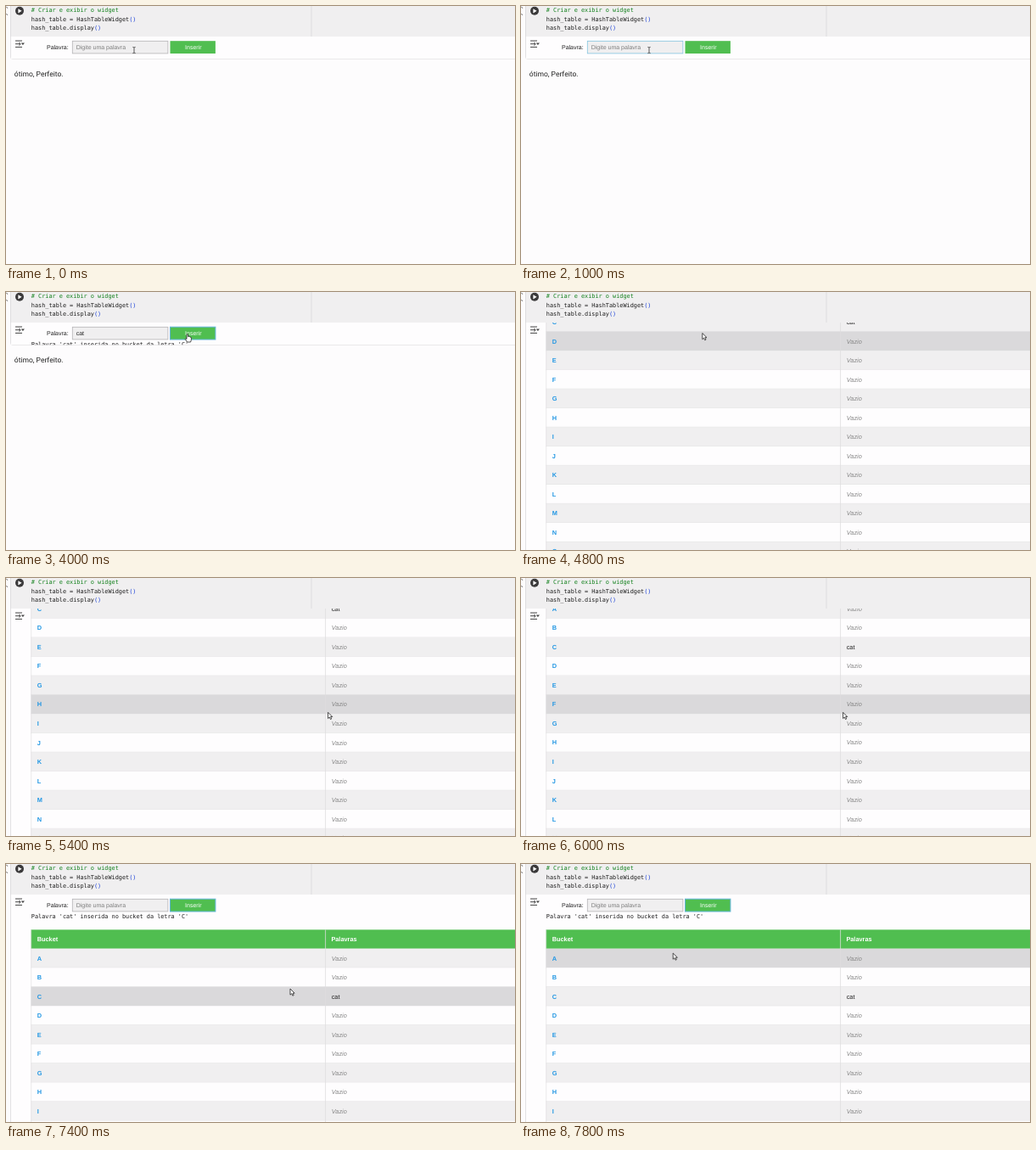
Write an HTML page that moves like this. It is 600x304 px and loops after 8 s.

```html
<!DOCTYPE html>
<html lang="pt">
<head>
<meta charset="utf-8">
<title>Hash table widget</title>
<style>
  html, body { margin: 0; width: 100%; height: 100%; overflow: hidden; background: #fdfcfd; }
  svg { display: block; width: 600px; height: 304px; }
  text { white-space: pre; text-rendering: geometricPrecision; }
  .code { font: 6.85px "DejaVu Sans Mono", monospace; fill: #1c1c1c; }
  .ui { font: 7px "Liberation Sans", Arial, sans-serif; fill: #222; }
  .cell { font: 7.35px "Liberation Sans", Arial, sans-serif; fill: #222; }
  .key { font-weight: bold; fill: #2196e3; }
  .head { font-weight: bold; fill: #fff; }
  .empty { font-style: italic; fill: #858585; }
  .note { font: 8.5px Roboto, sans-serif; fill: #222; }
  .paren { fill: #1a41d8; }
</style>
</head>
<body>
<svg viewBox="0 0 600 304">
  <defs>
    <clipPath id="view"><rect id="viewBox" x="6" y="36" width="594" height="26.3"/></clipPath>
  </defs>

  <rect width="600" height="304" fill="#fdfcfd"/>
  <text class="note" x="9.8" y="83">ótimo, Perfeito.</text>
  <path id="cellEdge" d="M5.5 36V60Q5.5 62.5 8 62.5H600" fill="none" stroke="#e2e1e3"/>

  <g clip-path="url(#view)">
    <rect x="6" y="36" width="594" height="268" fill="#fefdfe"/>
    <g id="scroller">
      <text class="ui" x="48" y="51">Palavra:</text>
      <rect id="field" x="78.3" y="41.3" width="112.6" height="14.6" fill="#f0eff0"/>
      <text id="entry" class="ui" x="82.7" y="51"></text>
      <rect id="button" x="193.5" y="41.2" width="53.4" height="14.8" fill="#50be50"/>
      <text class="ui" x="220.8" y="51" text-anchor="middle" style="fill:#fff">Inserir</text>
      <text id="message" class="code" x="29.8" y="64.3">Palavra 'cat' inserida no bucket da letra 'C'</text>
      <g id="table"></g>
    </g>
  </g>

  <rect x="5" width="595" height="36" fill="#f0eff0"/>
  <path d="M5.5 0V36M360 0V36" stroke="#dedddf"/>
  <path d="M0 1.2Q2 1 1.8 3M0 9.5Q2 9.3 1.6 11" fill="none" stroke="#777" stroke-width=".8"/>
  <circle cx="16" cy="5.8" r="5" fill="#3b3a3b"/>
  <path d="M14.4 3.2L18.6 5.8L14.4 8.4Z" fill="#fff"/>
  <text class="code" x="29.8" y="7.4" style="fill:#12801c"># Criar e exibir o widget</text>
  <text class="code" x="29.8" y="17.8">hash_table = HashTableWidget<tspan class="paren">()</tspan></text>
  <text class="code" x="29.8" y="28">hash_table.display<tspan class="paren">()</tspan></text>
  <path d="M11 41H19M11 48.4H19M11 44.7H17M15.2 42.9L17.2 44.7L15.2 46.5" fill="none" stroke="#444"/>
  <path d="M17.8 43.6H22L19.9 46Z" fill="#444"/>

  <g id="pointer">
    <path id="beam" d="M-1.6 -3.6Q0 -3.6 0 -2.8V2.8Q0 3.6 -1.6 3.6M1.6 -3.6Q0 -3.6 0 -2.8M0 2.8Q0 3.6 1.6 3.6" fill="none" stroke="#333" stroke-width=".8"/>
    <path id="arrow" d="M0 0V7.2L1.7 5.7L2.9 8.2L4.2 7.6L3 5.2H5.2Z" fill="#fff" stroke="#222" stroke-width=".8"/>
    <path id="hand" d="M-1 5.4V.6Q-.2 -.6 .6 .6V3.2Q1.4 2.5 2 3.4Q2.8 2.9 3.3 3.8Q4.4 3.5 4.4 4.8V7L3.6 9.6H-.4L-2.8 6.2Q-2.6 4.8 -1 6Z" fill="#fff" stroke="#222" stroke-width=".8"/>
  </g>
</svg>

<script>
const LOOP = 8000, ROW = 22.52, TOP = 99.75, SPLIT = 376.6;
const $ = id => document.getElementById(id);
const table = $("table");

function add(tag, attrs, text = "") {
  const el = document.createElementNS("http://www.w3.org/2000/svg", tag);
  for (const name in attrs) el.setAttribute(name, attrs[name]);
  el.textContent = text;
  return table.appendChild(el);
}

const band = (y, h, fill) => add("rect", { x: 29.5, y, width: 571, height: h, fill });
const label = (cls, x, y, text) => add("text", { class: "cell " + cls, x, y }, text);

band(77.4, TOP - 77.4, "#50be50");
label("head", 36.7, 91, "Bucket");
label("head", 383.4, 91, "Palavras");

const rows = [..."ABCDEFGHIJKLMNOPQRSTUVWXYZ"].map((letter, i) => {
  const y = TOP + i * ROW;
  const rect = band(y, ROW, "#fff");
  add("path", { d: `M29.5 ${y + ROW}H600`, stroke: "#dddcde", "stroke-width": .8 });
  label("key", 36.7, y + 13.8, letter);
  const word = letter === "C" ? "cat" : "Vazio";
  label(word === "cat" ? "" : "empty", 383.7, y + 13.8, word);
  return { letter, rect, base: i % 2 ? "#fefdfe" : "#f0eff0" };
});
add("path", { d: `M${SPLIT} 77.4V${TOP + rows.length * ROW}`, stroke: "#dddcde", "stroke-width": .8 });
add("path", { d: `M29.7 77.4V${TOP + rows.length * ROW}`, stroke: "#dddcde", "stroke-width": .6 });

// Each step overrides part of the state from its time onward.
const steps = [
  [0, { shape: "beam", x: 151, y: 52, text: "", focus: "", hover: "", scroll: 0, open: false, message: false }],
  [200, { focus: "field" }],
  [1600, { text: "c" }],
  [2000, { text: "ca" }],
  [2200, { text: "cat" }],
  [2800, { shape: "arrow", x: 180, y: 59 }],
  [3000, { x: 209, y: 59 }],
  [3400, { shape: "hand", x: 214, y: 49.4 }],
  [3600, { focus: "button" }],
  [4000, { message: true }],
  [4800, { shape: "arrow", x: 213.8, y: 48.5, text: "", open: true, scroll: 120.6, hover: "D" }],
  [5000, { x: 262, y: 84, scroll: 119.7, hover: "E" }],
  [5200, { x: 330, y: 130, hover: "G" }],
  [5400, { x: 379.6, y: 158.3, hover: "H" }],
  [5800, { scroll: 74.7 }],
  [6000, { hover: "F" }],
  [6600, { scroll: 0 }],
  [7400, { x: 335, y: 147, hover: "C" }],
  [7600, { x: 240, y: 123, hover: "B" }],
  [7800, { x: 179.2, y: 105, hover: "A" }]
];

function stateAt(time) {
  return Object.assign({}, ...steps.filter(([at]) => at <= time).map(step => step[1]));
}

function border(id, color, width) {
  $(id).setAttribute("stroke", color);
  $(id).setAttribute("stroke-width", width);
}

function draw(s) {
  $("pointer").setAttribute("transform", `translate(${s.x} ${s.y})`);
  for (const id of ["beam", "arrow", "hand"]) $(id).style.display = id === s.shape ? "" : "none";

  $("entry").textContent = s.text || "Digite uma palavra";
  $("entry").style.fill = s.text ? "#222" : "#7d7d7d";
  border("field", s.focus === "field" ? "#83c3df" : "#b4b3b5", .8);
  border("button", s.focus === "button" ? "#62b4d8" : "none", 1);

  $("message").style.display = s.message ? "" : "none";
  $("viewBox").setAttribute("height", s.open ? 268 : 26.3);
  $("cellEdge").setAttribute("d", s.open ? "M5.5 36V304" : "M5.5 36V60Q5.5 62.5 8 62.5H600");
  $("scroller").setAttribute("transform", `translate(0 ${-s.scroll})`);
  table.style.display = s.open ? "" : "none";
  for (const row of rows) row.rect.setAttribute("fill", row.letter === s.hover ? "#dad9db" : row.base);
}

const start = performance.now();
function tick() {
  draw(stateAt((performance.now() - start) % LOOP));
  requestAnimationFrame(tick);
}
tick();
</script>
</body>
</html>
```
